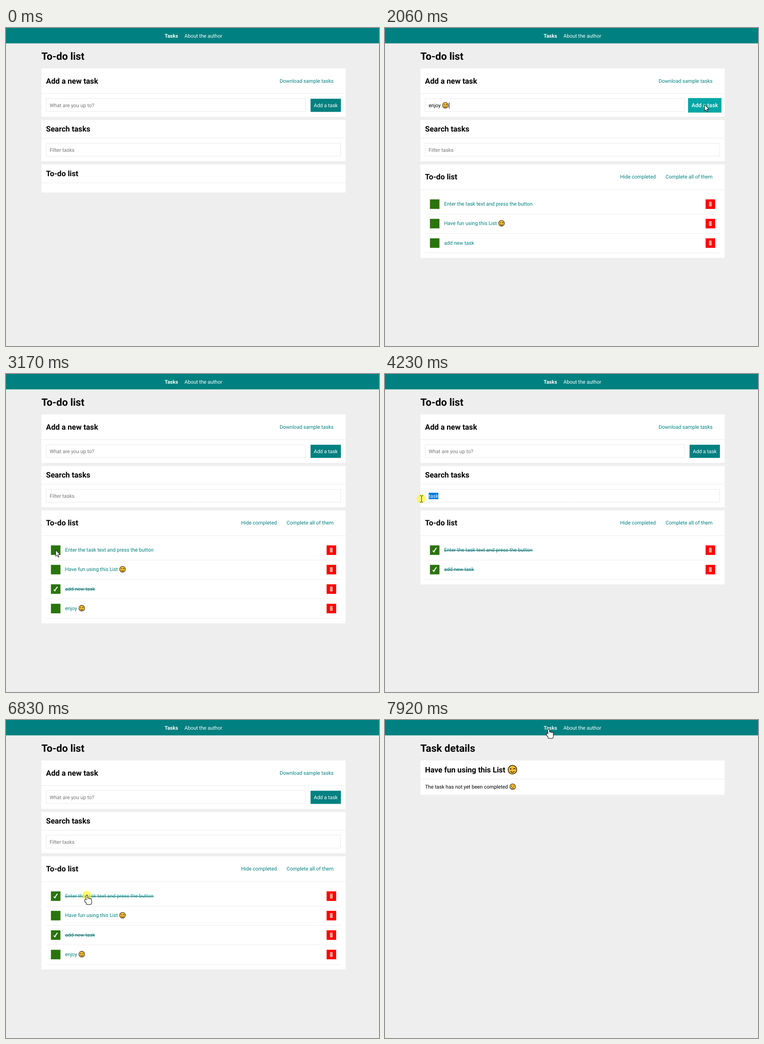
Animation of 811 by 691 pixels, one loop 8 s. Source, as an HTML page with a canvas:

```html
<!DOCTYPE html>
<html lang="en">
<head>
<meta charset="utf-8">
<title>To-do list</title>
<style>
html, body { margin: 0; width: 811px; height: 691px; overflow: hidden; background: #eee; }
canvas { display: block; }
</style>
</head>
<body>
<canvas id="stage" width="811" height="691"></canvas>
<script>
const ctx = document.getElementById('stage').getContext('2d');
const LOOP = 8000, EM = 11.04, DWELL = 150, PRESS = 100, KEY = 40;
const TEAL = '#008080', LIGHT = '#00a6a6', LINE = '#ececec';

const tasks = [
  { text: 'Enter the task text and press the button' },
  { text: 'Have fun using this List', face: 'wink' },
  { text: 'add new task' },
  { text: 'enjoy', face: 'wink' }
];

const rowY = i => 382.6 + 42.3 * i;
const checkbox = i => [108, rowY(i)];
const title = (i, x) => [x, rowY(i) - 1.5];
const SAMPLE = [692, 117], NEW = [330, 170], BUTTON = [695, 166], FILTER = [122, 268];
const HIDE = [577, 325], ALL = [650, 329], NAV = [356, 20];

const load = s => { s.count = 2; };
const focusNew = (s, t) => { s.focus = 'new'; s.since = t; };
const add = (s, t) => { s.count++; s.since = t; };
const focusFilter = (s, t) => { s.focus = 'filter'; s.since = t; };
const clear = s => { s.focus = ''; };
const toggle = i => s => { s.focus = ''; s.done[i] = !s.done[i]; };
const hide = s => { s.hidden = !s.hidden; };
const finish = s => { s.done.fill(true); };
const open = i => s => { s.page = tasks[i]; };
const back = s => { s.page = null; };

// the pointer rests at each place just before the time given, then acts
const stops = [
  [70, [714, 117]], [610, SAMPLE, load], [750, NEW, focusNew], [1440, [691, 182], add],
  [2300, BUTTON, add], [2500, BUTTON], [2940, checkbox(2), toggle(2)], [3290, checkbox(0), toggle(0)],
  [3910, FILTER, focusFilter], [4310, [79, 271], clear], [5080, HIDE, hide], [5400, HIDE, hide],
  [5780, ALL, finish], [6300, checkbox(3), toggle(3)], [6470, checkbox(1), toggle(1)],
  [6890, title(0, 176), open(0)], [7130, NAV, back], [7590, title(1, 200), open(1)], [8070, NAV]
];

const clamp = v => Math.max(0, Math.min(1, v));
const ease = v => v * v * (3 - 2 * v);
const typed = (s, ms) => s.slice(0, Math.max(0, Math.ceil(ms / KEY)));
const inside = (p, x, y, w, h) => p && p.x >= x && p.x <= x + w && p.y >= y && p.y <= y + h;

function stateAt(t) {
  const s = { count: 0, focus: '', since: 0, hidden: false, page: null, done: tasks.map(() => false) };
  for (const [time, , act] of stops) if (act && time <= t) act(s, time);
  return s;
}

function pointerAt(t) {
  const i = stops.findIndex(stop => stop[0] > t);
  if (i < 1) return null;
  const [start, a] = stops[i - 1], [end, b, act] = stops[i];
  const k = ease(clamp((t - start) / (end - DWELL - start)));
  return { x: a[0] + (b[0] - a[0]) * k, y: a[1] + (b[1] - a[1]) * k, pressed: act && t > end - PRESS };
}

function box(x, y, w, h, color) {
  ctx.fillStyle = color;
  ctx.fillRect(x, y, w, h);
}

function text(s, x, y, color = '#000', size = 1, weight = 400, align = 'left') {
  ctx.font = `${weight} ${EM * size}px Roboto, Arial, sans-serif`;
  ctx.textAlign = align;
  ctx.fillStyle = color;
  ctx.fillText(s, x, y);
  return ctx.measureText(s).width;
}

function face(kind, x, y, r) {
  ctx.save();
  ctx.translate(x, y);
  ctx.scale(r / 10, r / 10);
  const arc = (cx, cy, rad, a = 0, b = 7) => {
    ctx.beginPath();
    ctx.arc(cx, cy, rad, a, b);
  };
  const eye = cx => {
    arc(cx, -1.8, 1.5);
    ctx.fillStyle = '#2b2114';
    ctx.fill();
  };
  ctx.lineCap = 'round';
  ctx.strokeStyle = '#2b2114';
  ctx.lineWidth = 1.5;
  arc(0, 0, 9.2);
  ctx.fillStyle = '#fcbf36';
  ctx.fill();
  ctx.stroke();
  eye(-3.6);
  if (kind === 'wink') {
    arc(3.8, 0, 2.6, 3.7, 5.7);
    ctx.stroke();
  } else eye(3.6);
  if (kind === 'sad') {
    arc(0, 6.6, 3, 3.6, 5.8);
    ctx.stroke();
    arc(-5, 4.5, 2.4);
    ctx.fillStyle = '#3fb6ee';
    ctx.fill();
  } else {
    arc(0, 1.6, 4, 0.5, 2.64);
    ctx.stroke();
  }
  ctx.restore();
}

function label(s, kind, x, y, color, size = 1, weight = 400) {
  const w = text(kind ? s + ' ' : s, x, y, color, size, weight);
  if (!kind) return w;
  face(kind, x + w + EM * size * 0.68, y - EM * size * 0.36, EM * size * 0.62);
  return w + EM * size * 1.37;
}

function panel(y, bottom, head, base, line) {
  box(77, y, 661.5, bottom - y, '#fff');
  label(head.text, head.face, 87, base, '#000', 1.5, 700);
  box(77, line, 661.5, 1, LINE);
}

function field(y, w) {
  ctx.strokeStyle = '#e9e9e9';
  ctx.lineWidth = 1;
  ctx.strokeRect(87.5, y + 0.5, w - 1, 28);
}

function caret(x, y) {
  box(Math.round(x), y - 10, 1, 13, '#000');
}

function link(s, x, y, p, color) {
  const w = text(s, x, y, color || TEAL);
  if (!color && inside(p, x - 5, y - 14, w + 10, 21)) text(s, x, y, LIGHT);
}

function tick(x, y) {
  ctx.beginPath();
  ctx.moveTo(x - 4, y + 1);
  ctx.lineTo(x - 1.8, y + 4.2);
  ctx.quadraticCurveTo(x + 0.5, y - 1.5, x + 4, y - 4.8);
  ctx.strokeStyle = '#fff';
  ctx.lineWidth = 2;
  ctx.lineJoin = 'round';
  ctx.stroke();
}

function bin(x, y) {
  box(x - 2.8, y - 5, 5.6, 10, '#ffd9c9');
  box(x - 2.8, y - 3.5, 5.6, 0.7, '#b8473a');
  for (const d of [-1.5, 0.9]) box(x + d, y - 2.5, 0.7, 6.5, '#b8473a');
}

function addButton(t) {
  const k = ease(clamp((t - 1200) / 180)) - ease(clamp((t - 2500) / 160));
  ctx.save();
  ctx.translate(695.2, 168);
  ctx.scale(1 + k * 0.1, 1 + k * 0.1);
  box(-33, -14.3, 66, 28.6, k > 0 ? LIGHT : TEAL);
  text('Add a task', 0, 4, '#fff', 1, k > 0 ? 500 : 400, 'center');
  ctx.restore();
}

function addPanel(t, p, s) {
  panel(88, 193, { text: 'Add a new task' }, 121, 142);
  link('Download sample tasks', 595, 119, p);
  field(153, 565);
  const active = s.focus === 'new', draft = active && tasks[s.count];
  const ms = t - s.since - 2 * KEY;
  const part = draft ? typed(draft.text, ms) : '';
  let w = 0;
  if (part) w = label(part, ms > 500 && draft.face, 95, 172, '#000');
  else text('What are you up to?', 95, 172, '#757575');
  if (active) caret(95 + w, 172);
  addButton(t);
}

function searchPanel(query, selected) {
  panel(199.7, 289.5, { text: 'Search tasks' }, 225, 239);
  field(250, 641);
  if (!query) {
    text('Filter tasks', 95, 269, '#757575');
    return;
  }
  const w = text(query, 95, 269);
  if (selected) {
    box(95, 258, w, 14, '#0078d7');
    text(query, 95, 269, '#fff');
  } else caret(95 + w, 269);
}

function row(task, y, done, p) {
  box(97.7, y - 10.2, 20.7, 20.7, '#2a740c');
  if (done) tick(108, y);
  ctx.font = `${EM}px Roboto, Arial, sans-serif`;
  const hot = inside(p, 128, y - 8, ctx.measureText(task.text).width, 16);
  const w = label(task.text, task.face, 128.5, y + 3.4, hot ? LIGHT : TEAL);
  if (done) box(128.5, Math.round(y), w, 1, '#064f4f');
  box(697.1, y - 10.2, 20.7, 20.7, '#f00');
  bin(707.3, y);
  box(87, Math.round(y + 21), 641, 1, LINE);
  return hot;
}

function listPanel(p, s, query) {
  const head = { text: 'To-do list' };
  if (!s.count) {
    panel(296.3, 357.5, head, 322, 336);
    return false;
  }
  const order = tasks.map((task, i) => i).filter(i => i < s.count &&
    tasks[i].text.toLowerCase().includes(query) && !(s.hidden && s.done[i]));
  panel(296.3, rowY(order.length) - 10, head, 329, 351);
  const toggleText = s.hidden ? 'Show completed' : 'Hide completed';
  link(toggleText, 588.7 - ctx.measureText(toggleText).width / 1.5 * 0 - textWidth(toggleText), 327, p);
  link('Complete all of them', 610, 327, p, s.done.every(Boolean) && '#ccc');
  return order.map((i, n) => row(tasks[i], rowY(n), s.done[i], p)).some(Boolean);
}

function textWidth(s) {
  ctx.font = `${EM}px Roboto, Arial, sans-serif`;
  return ctx.measureText(s).width;
}

function details(task, done) {
  text('Task details', 77, 69, '#000', 2, 700);
  panel(88, 162.5, task, 114, 128);
  label(`The task has ${done ? '' : 'not yet '}been completed`, done ? 'smile' : 'sad', 87, 149, '#000');
}

function arrow(x, y) {
  ctx.beginPath();
  for (const [u, v] of [[0, 0], [0, 13.5], [3.1, 10.7], [5.2, 15.6], [7.3, 14.7], [5.2, 9.9], [9.4, 9.6]]) {
    ctx.lineTo(x + u, y + v);
  }
  ctx.closePath();
  ctx.fillStyle = '#fff';
  ctx.strokeStyle = '#000';
  ctx.lineWidth = 1;
  ctx.fill();
  ctx.stroke();
}

function hand(x, y) {
  // a dark pass, one pixel wider, gives the outline
  for (const edge of [1, 0]) {
    ctx.beginPath();
    const part = (u, v, w, h, r) =>
      ctx.roundRect(x + u - edge, y + v - edge, w + 2 * edge, h + 2 * edge, r + edge);
    for (let i = 0; i < 4; i++) part(-1.5 + 2.8 * i, i ? 5.5 + 0.6 * i : 0, 2.6, 10, 1.3);
    part(-1.5, 10, 11, 9.5, 3);
    part(-4.5, 9.5, 4, 5, 2);
    ctx.fillStyle = edge ? '#000' : '#fff';
    ctx.fill();
  }
}

function beam(x, y) {
  x = Math.round(x);
  y = Math.round(y);
  box(x, y - 6, 1, 13, '#222');
  for (const d of [-7, 7]) {
    box(x - 3, y + d, 3, 1, '#222');
    box(x + 1, y + d, 3, 1, '#222');
  }
}

function glow(p) {
  ctx.beginPath();
  ctx.arc(p.x - 0.5, p.y, 10, 0, 7);
  ctx.fillStyle = 'rgba(255, 246, 50, 0.68)';
  ctx.fill();
}

function draw(t) {
  const p = pointerAt(t), s = stateAt(t);
  const nav = inside(p, 344, 8, 32, 18);
  box(0, 0, 811, 691, '#eee');
  box(0, 0, 811, 33.4, TEAL);
  text('Tasks', 345, 21, nav ? '#ecf6f6' : '#fff', 1, 700);
  text('About the author', 388, 21, '#fff');

  let cursor = arrow;
  if (s.page) {
    details(s.page, s.done[tasks.indexOf(s.page)]);
    cursor = hand;
  } else {
    const ms = t - s.since;
    const query = s.focus === 'filter' ? typed('task', ms) : '';
    text('To-do list', 77, 69, '#000', 2, 700);
    addPanel(t, p, s);
    searchPanel(query, ms > 6 * KEY);
    if (listPanel(p, s, query) || nav) cursor = hand;
    if (inside(p, 87, 153, 565, 29) || inside(p, 77, 250, 651, 29)) cursor = beam;
  }
  if (!p) return;
  if (p.pressed) glow(p);
  cursor(p.x, p.y);
}

ctx.textRendering = 'geometricPrecision';
function play() {
  draw(performance.now() % LOOP);
  requestAnimationFrame(play);
}
play();
</script>
</body>
</html>
```
